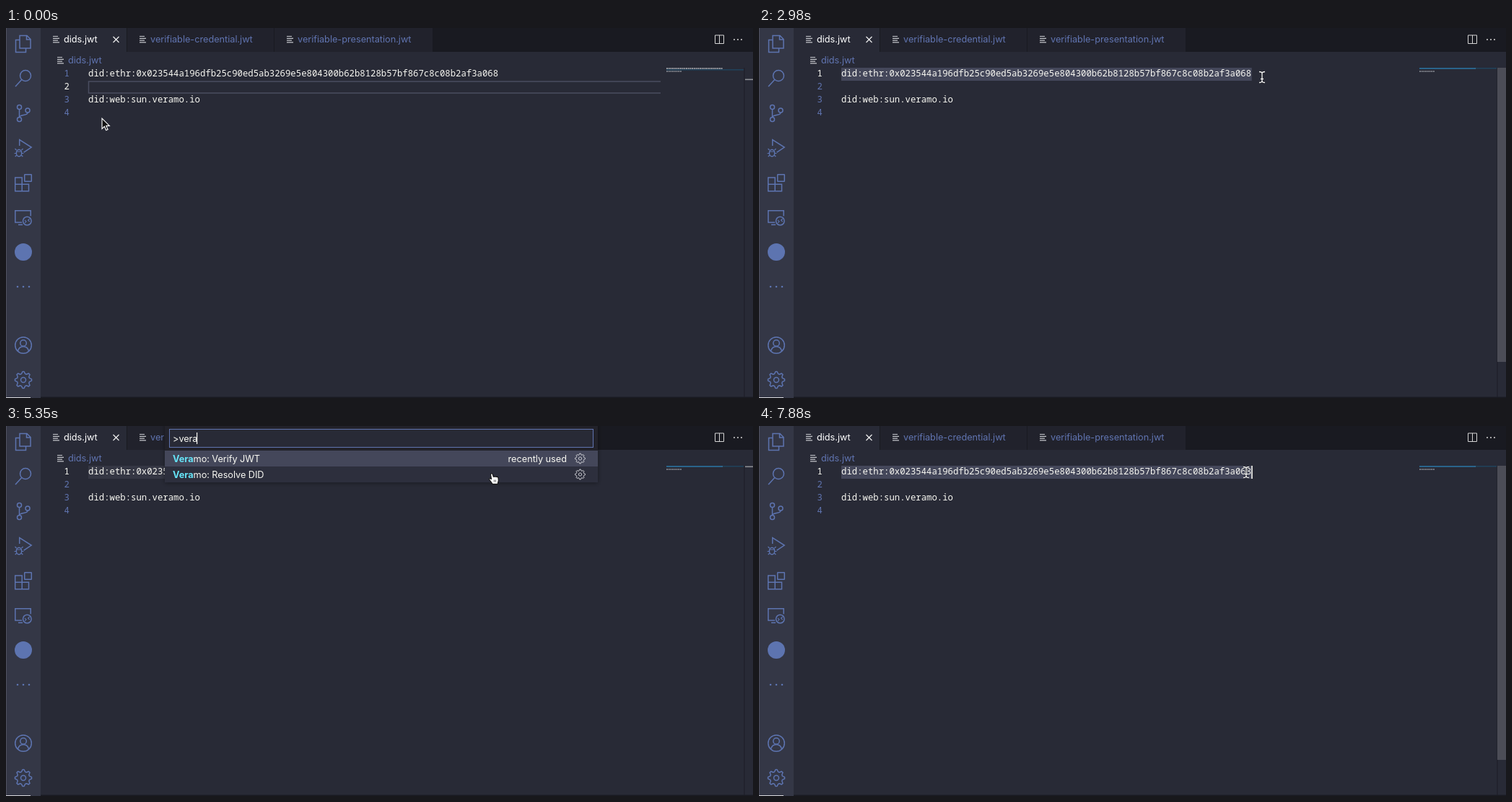
Animation, 1035 px wide and 512 px high, one loop 8000 ms. Source, as an HTML page:

```html
<!DOCTYPE html>
<html lang="en">
<head>
<meta charset="utf-8">
<title>Editor command palette</title>
<style>
  html, body { margin: 0; width: 100%; height: 100%; overflow: hidden; background: #282a36; }
  svg { display: block; width: 1035px; height: 512px; }
  text { white-space: pre; }
  .ui { font: 12.75px Inter, "Open Sans", sans-serif; letter-spacing: -.03px; }
  .list { letter-spacing: -.06px; fill: #f8f8f2; }
  .code { font: 500 12.31px "Noto Sans Mono", "DejaVu Sans Mono", monospace; fill: #f8f8f2; }
  .key { font: 11px Inter, "DejaVu Sans", sans-serif; text-anchor: middle; }
  .hit { font-weight: 700; fill: #66e4f7; }
  .muted { fill: #6074b0; }
  .icon { fill: none; stroke: #5d74b0; stroke-width: 1.5; }
</style>
</head>
<body>
<svg id="stage" viewBox="0 0 1035 512"></svg>
<script>
const LOOP = 8000, CHAR = 7.386, LEFT = 114;
const DID = 'did:ethr:0x023544a196dfb25c90ed5ab3269e5e804300b62b8128b57bf867c8c08b2af3a068';
const WEB = 'did:web:sun.veramo.io';

const rect = (x, y, w, h, fill, more = '') =>
  `<rect x="${x}" y="${y}" width="${w}" height="${h}" fill="${fill}" ${more}/>`;
const circle = (x, y, r, more = '') => `<circle cx="${x}" cy="${y}" r="${r}" ${more}/>`;
const path = (d, more = '') => `<path d="${d}" ${more}/>`;
const text = (x, y, s, cls, more = '') => `<text x="${x}" y="${y}" class="${cls}" ${more}>${s}</text>`;
const esc = s => s.replace(/>/g, '&gt;');

function gear(cx, cy, r, more = '') {
  const pts = [];
  for (let i = 0; i < 32; i++) {
    const a = (i - .5) * Math.PI / 16;
    const d = i % 4 < 2 ? r : r * .76;
    pts.push((cx + d * Math.cos(a)).toFixed(1) + ' ' + (cy + d * Math.sin(a)).toFixed(1));
  }
  return `<g ${more}>${path('M' + pts.join('L') + 'z', 'stroke-linejoin="round"')}${circle(cx, cy, r * .3)}</g>`;
}

const fileIcon = (x, y) =>
  path(`M${x} ${y + .5}h7M${x} ${y + 3.3}h9M${x} ${y + 6.1}h7M${x} ${y + 8.9}h9`, 'stroke="#c3c5ca" stroke-width="1.2"');

function activityBar() {
  return rect(0, 0, 48, 512, '#343746') + rect(0, 0, 1, 512, '#4f5160') + '<g class="icon">' +
    path('M19 10.5h10l5 5V28H19zM28.5 10.5V16H34M19 16.5h-5.5v17h14V28') +
    circle(27, 66, 7.5) + path('M21.7 71.6L13 81') +
    circle(18.5, 109.5, 3) + circle(30, 114, 3) + circle(18.5, 126.5, 3) +
    path('M18.5 112.5v11M30 117c0 5-11 2-11.3 6.5') +
    path('M18.7 163v-8.5l16.5 10.6-10.6 7') +
    '<ellipse cx="18" cy="173" rx="3.7" ry="4.8"/>' +
    path('M14.5 171h7M14.5 169l-2-2M21.5 169l2-2M14 173.5h-2.5M22 173.5h2.5M14.7 176l-2 2M21.3 176l2 2', 'stroke-width="1.2"') +
    path('M12.7 207h9.5v18.7h-9.5zM12.7 216.3h18.8v9.4h-9.3') + rect(25.7, 202.7, 9.6, 9.6, 'none', 'rx=".5"') +
    path('M22 269h-9.2v-16.2h21.4v7.5M17 272.3h6') + circle(29.3, 267, 5.8) +
    path('M26 265.8l2 2-2 2M32.6 264l-2 2 2 2', 'stroke-width="1.1"') +
    circle(24, 310, 12, 'fill="#5d74b0" stroke="none"') +
    [16, 24, 32].map(x => circle(x, 358, 1.3, 'fill="#5d74b0" stroke="none"')).join('') +
    circle(24, 439, 11.3) + circle(24, 436, 4.3) + path('M16.4 447.3c1-4.5 4-6.6 7.6-6.6s6.6 2.1 7.6 6.6') +
    gear(24, 487, 11.6) + '</g>';
}

function tabs() {
  return rect(48, 0, 987, 33, '#191a21') + rect(48, 0, 119, 33, '#282a36') +
    rect(168, 0, 203, 33, '#21222c') + rect(372, 0, 219, 33, '#21222c') +
    fileIcon(65, 11) + text(80, 20, 'dids.jwt', 'ui', 'fill="#fff"') +
    path('M148.5 12l8 8M156.5 12l-8 8', 'stroke="#f0f0f0" stroke-width="1.2"') +
    fileIcon(185, 11) + text(200, 20, 'verifiable-credential.jwt', 'ui muted') +
    fileIcon(389, 11) + text(404, 20, 'verifiable-presentation.jwt', 'ui muted') +
    path('M982.5 10h12v11.5h-12zM988.5 10v11.5', 'fill="none" stroke="#d4d4d4"') +
    [1009, 1014, 1019].map(x => circle(x, 16, 1, 'fill="#d4d4d4"')).join('') +
    fileIcon(71, 40) + text(86, 49, 'dids.jwt', 'ui muted');
}

const lineTop = n => 55 + 18 * (n - 1);

function editor(s) {
  const y = lineTop(s.line), x = LEFT + s.sel * CHAR, mini = 55 + 2 * (s.line - 1);
  let out = '';
  if (s.sel) out += rect(LEFT, 55, s.sel * CHAR, 18, s.query == null ? '#44475a' : '#353744');
  else out += path(`M907 ${y + 19}H114.5V${y + 35}H907`, 'fill="none" stroke="#4a4d60" stroke-width="1.5" transform="translate(0 -18)"');
  for (let n = 1; n <= 4; n++)
    out += text(88, lineTop(n) + 12, n, 'code', `text-anchor="end" style="fill:${n === s.line ? '#f8f8f2' : '#6074b0'}"`);
  out += text(LEFT, 67, DID, 'code') + text(LEFT, 103, WEB, 'code');
  if (s.caret && s.query == null) out += rect(x - .5, y, 1.6, 18, '#f8f8f2');

  out += rect(915, mini, 107, 1.6, '#21415a');
  out += path('M915 56h78', 'stroke="#b8bac0" stroke-width="1.3" stroke-dasharray="2 .7"');
  out += path('M915 60h21', 'stroke="#8f929b" stroke-width="1.3" stroke-dasharray="2 .7"');
  if (s.sel) out += rect(915, 55, s.sel * 1.01, 2, '#2a648b');
  out += rect(1022.5, 55, 1, 456, '#1c1d26');
  out += rect(1024, 56 + 15 * (s.line - 1) - .5, 11, 1.6, '#8c8e94');
  if (s.bar) out += rect(1023, 55, 12, 407, '#4c4d57', `opacity="${s.bar}"`);
  return out;
}

const ROWS = [
  { label: 'Veramo: Verify JWT', recent: true },
  { label: 'Veramo: Resolve DID' },
  { label: 'Developer: Reload Window', keys: [[767, '⌘'], [792, 'R']] },
  { label: 'SVG Viewer: View SVG', keys: [[709, '⇧'], [736.5, '⌥'], [762, 'S'], [791, 'O']] },
  { label: 'Open SVG Editor' },
  { label: 'Developer: Toggle Screencast Mode' },
  { label: 'VS Color Picker' },
  { label: 'Crates: Do not call manually ! Replace Version of the provided depende...', other: true }
];
const CARETS = [239, 245.5, 252.5, 257, 264.5, 276, 283.5];

// The first match at a word start wins, then any match.
function mark(label, q) {
  if (!q) return label;
  let i = label.search(new RegExp('\\b' + q, 'i'));
  if (i < 0) i = label.toLowerCase().indexOf(q);
  const end = i + q.length;
  return `${label.slice(0, i)}<tspan class="hit">${label.slice(i, end)}</tspan>${label.slice(end)}`;
}

const pointingHand = (x, y) =>
  path(`M${x + 3} ${y + 1}q1.5-1.5 3 0v5.5l5 1.3q1.4.6 1 2.4l-.8 3.3q-.6 1.5-2 1.5h-4.5L${x + .6} ${y + 10}q-.6-2 1-1.8l1.4 1z`, 'fill="#ffc83d"');

function palette(s) {
  const q = s.query, rows = ROWS.filter(r => r.label.toLowerCase().includes(q));
  const extra = rows.some(r => r.other) ? 1 : 0, h = 34 + rows.length * 22 + extra;
  let out = rect(220, -6, 600, h + 6, '#21222c', 'filter="url(#shadow)"') +
    rect(226.5, 4.5, 587, 25, '#282a36', 'stroke="#6074b0"') +
    text(231, 22, esc('>' + q), 'ui list');
  if (s.caret) out += rect(CARETS[q.length] - .5, 9, 1.2, 16, '#f8f8f2');

  rows.forEach((r, i) => {
    const top = 34 + 22 * i, base = top + 16, on = i === s.pick, hover = i === 1;
    if (on) out += rect(220, top, 600, 22, '#44475a');
    else if (hover) out += rect(220, top, 600, 22, '#2d2f3d');
    if (r.other) {
      if (q) out += rect(220, top, 600, 1.2, '#bd8df5') +
        text(802, base + 1, 'other commands', 'ui', 'fill="#66e4f7" text-anchor="end"');
      out += pointingHand(232, top + 5) + text(247, base + 1, mark(r.label, q), 'ui list');
      return;
    }
    out += text(231, base, mark(r.label, q), 'ui list');
    if (r.recent) out += text(on ? 777 : 802, base, 'recently used', 'ui', `fill="${on ? '#f8f8f2' : '#66e4f7'}" text-anchor="end"`);
    if (on || hover) out += gear(795.5, top + 11, 7, 'fill="none" stroke="#c9cad0"');
    for (const [x, k] of r.keys || [])
      out += rect(x - 10.5, top + 2.5, 21, 17, '#333541', 'rx="3"') + text(x, base - 1, k, 'key', 'fill="#d6d7dc"');
  });
  if (rows.length > 7) out += rect(810, 34, 10, 21, '#565863');
  return out;
}

const POINTERS = {
  arrow: path('M0 0v14.5l3.4-3.2 2.3 5.2 2.4-1-2.3-5.1h4.6z', 'fill="#111" stroke="#fff" stroke-width="1.1"'),
  beam: ['stroke="#22232b" stroke-width="3.2"', 'stroke="#f4f4f4" stroke-width="1.3"'].map(st =>
    path('M-4-7.5q4 0 4 2.5v10q0 2.5-4 2.5M4-7.5q-4 0-4 2.5M4 7.5q-4 0-4-2.5M-2 2.5h4', 'fill="none" ' + st)).join(''),
  hand: path('M-3.5 2.5q1.6-1.6 2.8.4l1 3.5q1-1 2.2 0 1.2-.8 2.2.2 1.5-.6 2.2.8l.4 4-1.2 5H-.8L-5 10.5q-1-2 1-2l1.5 1z',
    'fill="#fff" stroke="#111" stroke-width="1.1" stroke-linejoin="round"') + path('M1.4 10.5v3M3.4 10.5v3', 'stroke="#333" stroke-width=".8"')
};

const at = (x, y, more) => ({ x, y, ...more });
const STEPS = [
  [0, at(133, 125, { shape: 'arrow', line: 2, sel: 0, caret: false, bar: 0, query: null, pick: 0 })],
  [450, at(138, 130, { shape: 'beam', bar: .5 })],
  [600, at(137, 122, { bar: 1 })],
  [750, at(136, 119, { line: 4, caret: true })],
  [890, at(132, 106)],
  [1040, at(124, 88)],
  [1190, at(117, 73)],
  [1340, at(115, 67)],
  [1640, { line: 1 }],
  [1790, at(175, 68, { sel: 8 })],
  [1930, at(352, 70, { sel: 31 })],
  [2080, at(545, 70, { sel: 57 })],
  [2230, at(637, 70, { sel: 70 })],
  [2380, at(679, 70, { sel: 76 })],
  [2530, at(695, 70, { sel: 77 })],
  [2680, at(701, 69)],
  [2980, at(697, 68, { caret: false })],
  [3130, at(688, 67)],
  [3270, at(680, 65)],
  [3410, at(675, 64, { caret: true })],
  [3860, { caret: false }],
  [4010, { shape: 'hand' }],
  [4150, { query: '', caret: true }],
  [4600, { bar: .4 }],
  [4750, { query: 'v', bar: 0 }],
  [5050, { query: 've' }],
  [5200, { query: 'ver' }],
  [5350, { query: 'vera' }],
  [5490, { query: 'veram' }],
  [5640, { query: 'veramo' }],
  [6080, { caret: false }],
  [6680, { caret: true }],
  [6980, { pick: 1 }],
  [7130, { caret: false }],
  [7580, { caret: true }],
  [7880, { query: null, shape: 'beam', bar: 1 }]
];

let state = {};
const states = STEPS.map(([, change]) => state = { ...state, ...change });

document.getElementById('stage').innerHTML =
  '<defs><filter id="shadow" x="-5%" y="-20%" width="110%" height="150%"><feDropShadow dx="0" dy="1" stdDeviation="3" flood-opacity=".4"/></filter></defs>' +
  rect(0, 0, 1035, 512, '#282a36') + activityBar() + tabs() +
  rect(48, 510.5, 987, 1.5, '#191a21') + rect(0, 511, 34, 1, '#d8d8dc') +
  '<g id="editor"></g><g id="palette"></g><g id="pointer"></g>';

const [editorEl, paletteEl, pointerEl] = ['editor', 'palette', 'pointer'].map(id => document.getElementById(id));
const start = performance.now();
let shown = -1;

function frame() {
  const t = (performance.now() - start) % LOOP;
  let i = STEPS.length - 1;
  while (STEPS[i][0] > t) i--;
  if (i !== shown) {
    const s = states[shown = i];
    editorEl.innerHTML = editor(s);
    paletteEl.innerHTML = s.query == null ? '' : palette(s);
    pointerEl.innerHTML = POINTERS[s.shape];
    pointerEl.setAttribute('transform', `translate(${s.x} ${s.y})`);
  }
  requestAnimationFrame(frame);
}
frame();
</script>
</body>
</html>
```
